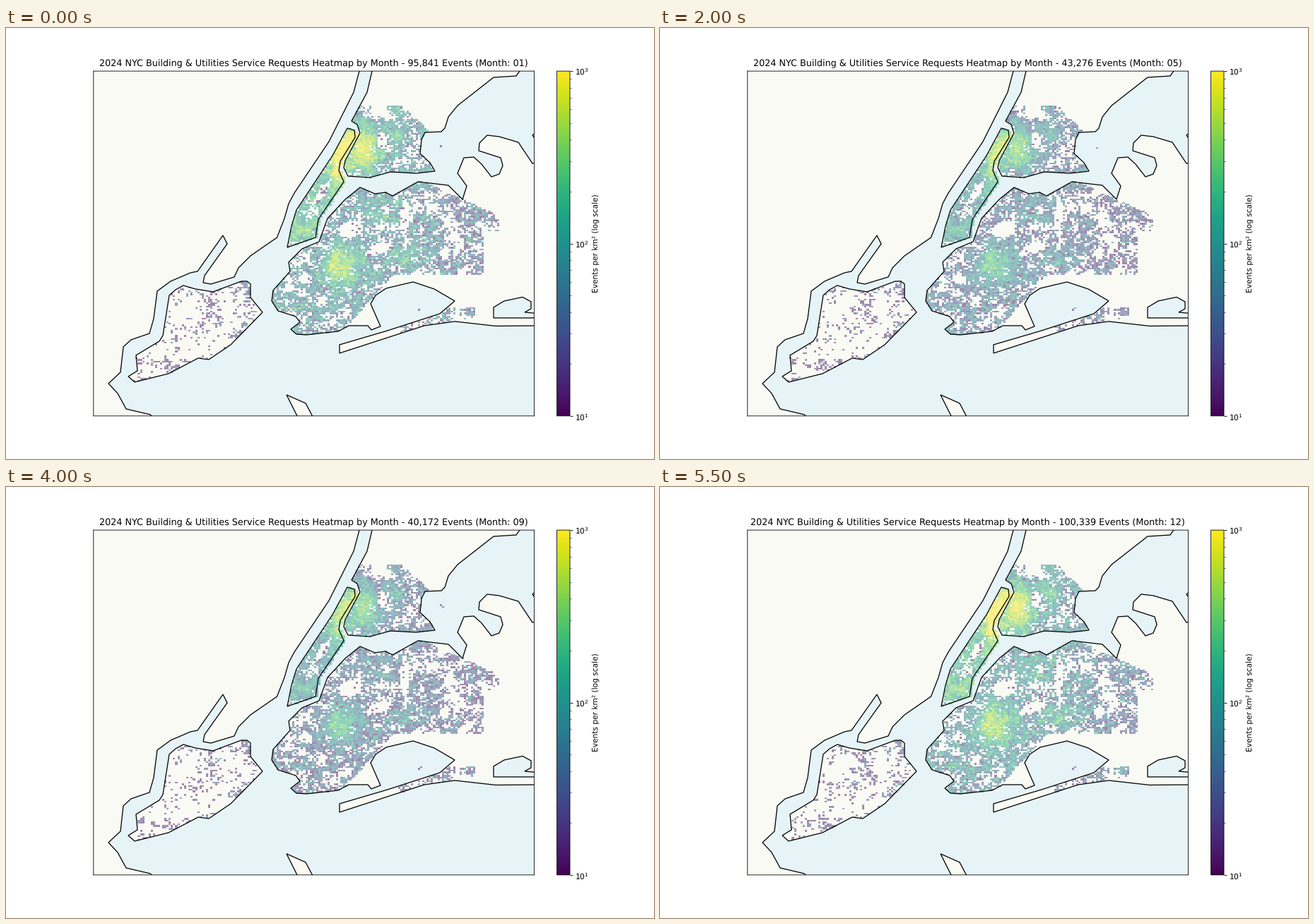
These frames come from a looping animation (917x611 px, 6000 ms). A matplotlib script:

```python
import matplotlib.pyplot as plt
import numpy as np
from matplotlib.animation import FuncAnimation
from matplotlib.cm import ScalarMappable
from matplotlib.colors import LogNorm
from matplotlib.path import Path

W, H, S = 917, 611, 0.764
LEFT, RIGHT, TOP, BOTTOM = 123.8, 747.4, 61.1, 549.9
BINS = 200
CELL_KM2 = 0.077
LAND, WATER = "#fafaf4", "#e6f3f7"
TOTALS = [95841, 70318, 63427, 52164, 43276, 38985,
          42524, 41053, 40172, 61835, 74359, 100339]

plt.rcParams.update({
    "font.size": 10 * S, "axes.titlepad": 6 * S, "axes.labelpad": 4 * S,
    "axes.linewidth": 0.8 * S, "ytick.major.size": 3.5 * S,
    "ytick.minor.size": 2 * S, "ytick.major.width": 0.8 * S,
    "ytick.minor.width": 0.6 * S, "ytick.major.pad": 3.5 * S,
    "text.hinting": "none",
})

# Key corners of the coastlines in stage pixels, y downwards
MAINLAND = [(500, 55), (500, 61), (492, 91), (457, 161), (408, 234), (400, 249),
            (394, 270), (383.5, 297), (346, 323), (329, 340), (323, 353),
            (290, 363), (279, 361), (281, 351), (313, 306), (307, 294),
            (271, 345), (261, 347), (233, 359), (214, 373), (209, 412),
            (203, 433), (177, 442), (166, 452), (162, 488), (145, 504),
            (158, 518), (170, 540), (204, 548), (212, 556), (115, 556), (115, 55)]
STATEN = [(251, 365), (268, 370), (293, 374), (333, 359), (341, 359), (346, 363),
          (346, 382), (363, 403), (318, 449), (287, 470), (272, 468), (230, 490),
          (182, 502), (173, 494), (186, 486), (184, 464), (217, 444), (222, 436),
          (231, 379), (240, 371)]
MANHATTAN = [(483, 142), (493, 145), (494, 155), (473, 189), (471, 202),
             (478, 218), (442, 271), (438, 297), (398, 311), (404, 281),
             (411, 258), (462, 181)]
BRONX = [(518, 55), (518, 61), (511, 91), (489, 132), (497, 137), (501, 149),
         (480, 188), (478, 198), (484, 210), (515, 212), (544, 204), (580, 206),
         (607, 203), (600, 191), (586, 178), (588, 158), (593, 148), (616, 147),
         (621, 142), (626, 126), (639, 110), (690, 70), (722, 68), (731, 55)]
LONG_ISLAND = [(756, 190), (745, 192), (725, 162), (698, 154), (681, 152),
               (670, 163), (669, 174), (700, 184), (703, 195), (698, 207),
               (687, 211), (673, 193), (662, 183), (648, 184), (639, 206),
               (652, 224), (646, 243), (626, 223), (583, 218), (547, 238),
               (537, 233), (522, 235), (501, 226), (480, 243), (455, 270),
               (443, 303), (419, 313), (400, 332), (402, 345), (378, 372),
               (376, 387), (385, 401), (410, 409), (416, 417), (403, 427),
               (411, 434), (425, 435), (470, 430), (485, 422), (512, 422),
               (517, 428), (530, 423), (516, 391), (523, 379), (538, 369),
               (576, 360), (606, 370), (635, 387), (614, 405), (540, 429),
               (472, 449), (472, 461), (592, 422), (635, 416), (693, 422.5),
               (756, 422)]
LAGOON = [(756, 411), (690, 411), (690, 396), (705, 387), (731, 381.5),
          (743, 388), (743, 398), (734, 403), (756, 405)]
HOOK = [(397, 520), (424, 532), (434, 551), (436, 556), (415, 556)]
EAST_TIP = [(756, 143), (745, 152), (756, 168)]

# x, y, x radius, y radius, log gain
HOTSPOTS = [
    (507, 172, 24, 34, 3.1), (474, 188, 18, 34, 1.8), (552, 145, 14, 45, 1.2),
    (473, 337, 30, 32, 2.5), (532, 266, 30, 14, 1.3), (580, 320, 45, 14, 0.9),
    (325, 370, 50, 12, 1.3), (648, 404, 14, 8, 1.7),
]
# Parks and cemeteries: x, y, half width, half height, slant in degrees
GAPS = [
    (447, 234, 5, 19, 33), (532, 160, 6, 12, 0), (424, 356, 9, 7, 0),
    (488, 285, 17, 11, -15), (527, 315, 22, 6, -18), (564, 268, 6, 30, 0),
]

dx, dy = (RIGHT - LEFT) / BINS, (BOTTOM - TOP) / BINS
gx, gy = np.meshgrid(LEFT + dx * (np.arange(BINS) + 0.5),
                     TOP + dy * (np.arange(BINS) + 0.5))


def inside(outline):
    centers = np.column_stack([gx.ravel(), gy.ravel()])
    return Path(outline).contains_points(centers).reshape(gx.shape)


def near(x, y, rx, ry, slant=0):
    """Squared distance from a point, measured in ellipse radii."""
    c, s = np.cos(np.radians(slant)), np.sin(np.radians(slant))
    u, v = c * (gx - x) + s * (gy - y), c * (gy - y) - s * (gx - x)
    return (u / rx) ** 2 + (v / ry) ** 2


def smooth(field, passes):
    for _ in range(passes):
        for axis in (0, 1):
            field = field + np.roll(field, 1, axis) + np.roll(field, -1, axis)
    return field / field.std()


def base_level():
    """Log request rate of each borough, -inf outside the city."""
    island = inside(LONG_ISLAND)
    manhattan = inside(MANHATTAN)
    manhattan |= np.roll(manhattan, 1, axis=1)
    bronx = inside(BRONX) & (gy > 109) & (gx - gy < 452)
    bronx &= (gy > 124) | (abs(gx - 528) > 12)
    queens = island & ((1.1 * gx + gy < 953) | (gy < 350))
    queens &= (gy > 243 + 0.46 * (gx - 646)) & (gx < np.where(gy < 288, 698, 676))
    beach = island & (gy > 397) & (gx > 545) & (gx < 662)
    beach &= (gy < 412) | (gx < 630)
    islets = (near(617, 171, 5, 8) < 1) | (near(586, 400, 3, 8) < 1)
    east = np.clip((gx - 575) / 75, 0, 1.2)
    return np.select([manhattan, bronx, queens, beach, inside(STATEN), islets],
                     [2.5, 1.1, 1.2 - east, 0.2, -1.0, -0.2], -np.inf)


def build_rates():
    """Expected requests per cell in the first month."""
    level = base_level()
    for *ellipse, gain in HOTSPOTS:
        level += gain * np.exp(-near(*ellipse))
    cell, patch = np.random.default_rng(24).normal(size=(2, BINS, BINS))
    noise = 0.75 * cell + 0.65 * smooth(patch, 3)
    rate = np.exp(level + noise * (0.9 - 0.15 * np.clip(level, 0, 4)))
    rate[noise < -0.45 * level] = 0
    for gap in GAPS:
        rate[near(*gap) < 1] *= 0.02
    return rate


rates = build_rates()
# Dense areas follow the season more strongly than sparse ones
season = np.clip(0.3 + 0.2 * np.log1p(rates), 0, 0.95)
norm = LogNorm(10, 1000, clip=True)


def heat(month):
    share = TOTALS[month] / TOTALS[0]
    counts = np.random.default_rng(100 + month).poisson(rates * share ** season)
    rgba = plt.cm.viridis(norm(np.maximum(counts, 1) / CELL_KM2))
    rgba[..., 3] = 0.5 * (counts > 0)
    return rgba


def title_text(month):
    return ("2024 NYC Building & Utilities Service Requests Heatmap by Month - "
            f"{TOTALS[month]:,} Events (Month: {month + 1:02d})")


def stage_axes(left, right):
    return fig.add_axes([left / W, 1 - BOTTOM / H,
                         (right - left) / W, (BOTTOM - TOP) / H])


fig = plt.figure(figsize=(W / 100, H / 100), dpi=100, facecolor="white")
ax = stage_axes(LEFT, RIGHT)
ax.set_facecolor(WATER)
ax.set_xticks([])
ax.set_yticks([])
for spine in ax.spines.values():
    spine.set_snap(False)

for shore in (MAINLAND, STATEN, MANHATTAN, BRONX, LONG_ISLAND, HOOK, EAST_TIP, LAGOON):
    ax.fill(*zip(*shore), fc=WATER if shore is LAGOON else LAND, ec="none", zorder=1)
    ax.fill(*zip(*shore), fc="none", ec="black", lw=1.2 * S, zorder=3)

image = ax.imshow(heat(0), extent=(LEFT, RIGHT, BOTTOM, TOP), aspect="auto",
                  interpolation="nearest", zorder=2)
ax.set_xlim(LEFT, RIGHT)
ax.set_ylim(BOTTOM, TOP)
title = ax.set_title(title_text(0))

bar = fig.colorbar(ScalarMappable(norm, "viridis"), cax=stage_axes(779.5, 798))
bar.set_label("Events per km² (log scale)")
bar.outline.set_snap(False)


def update(month):
    image.set_data(heat(month))
    title.set_text(title_text(month))
    return image, title


anim = FuncAnimation(fig, update, frames=12, interval=500, repeat=True,
                     repeat_delay=0, blit=False)
plt.show()
```
